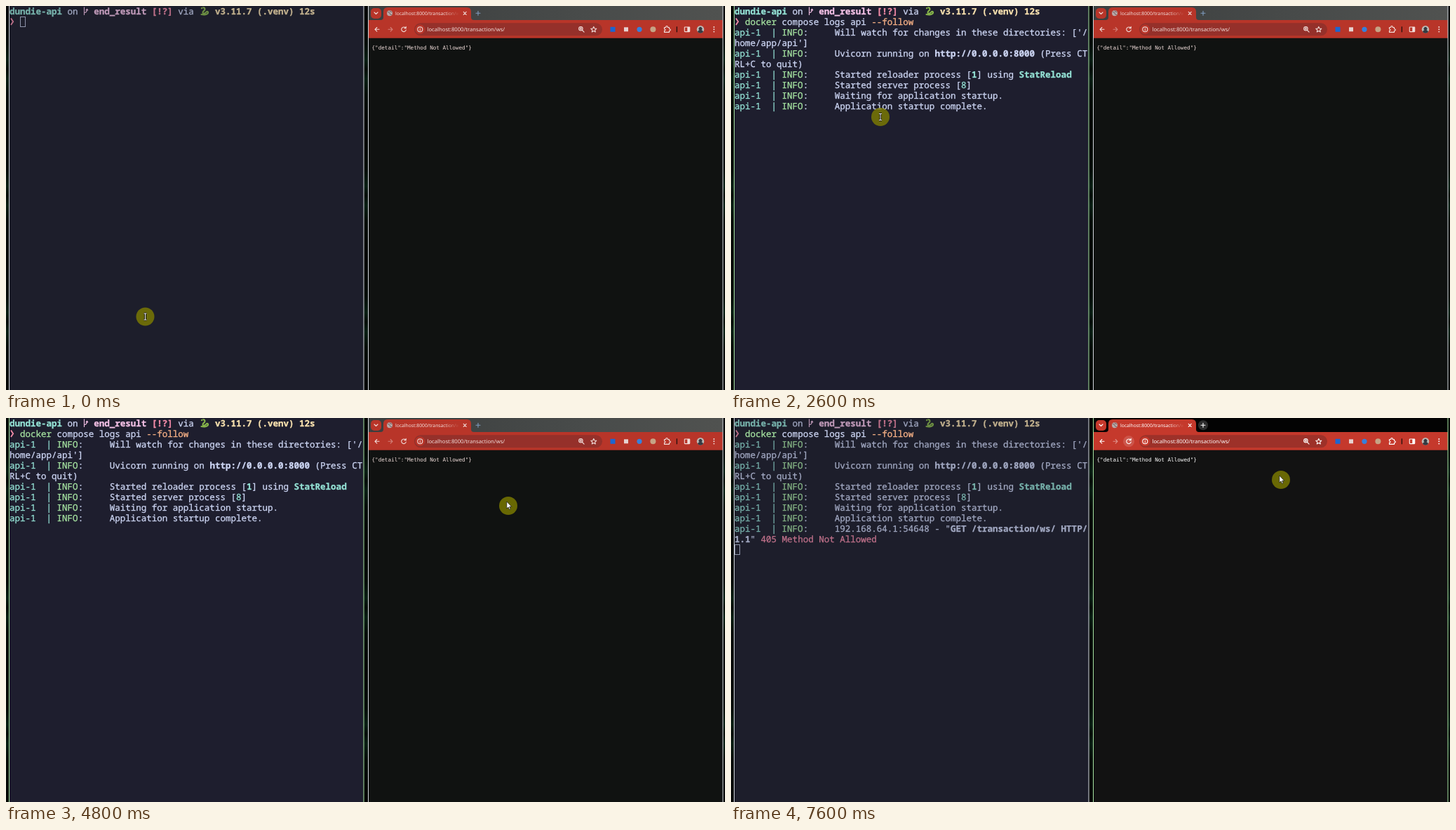
An HTML page for the animation above (8000 ms loop, 1025x547 px).

```html
<!DOCTYPE html>
<html lang="en">
<head>
<meta charset="utf-8">
<title>Terminal and browser</title>
<style>
html, body { margin: 0; width: 100%; height: 100%; overflow: hidden; background: #050807; }
svg { position: absolute; left: 0; top: 0; width: 1025px; height: 547px; }
[hidden] { display: none !important; }

#term {
  --edge: #d3d7dd; position: absolute; left: 5px; top: 0; width: 505px; height: 547px;
  background: #1d1e2b; overflow: hidden;
}
#term.focus { background: #1e1e2e; }
#prompt, #log, #request, #glyphs { opacity: .75; }
.focus :is(#prompt, #log, #request, #glyphs) { opacity: 1; }
.row {
  --c: #cdd6f4; height: 15px; width: 504px; color: var(--c); white-space: pre;
  font: 500 12.53px/15px "Noto Sans Mono", monospace; -webkit-text-stroke: .3px;
  text-rendering: geometricPrecision; font-variant-ligatures: none;
}
.row i { display: inline-block; height: 15px; vertical-align: top; font-style: normal; color: var(--c); }
.teal { --c: #94e2d5; }
.green { --c: #a6e3a1; }
.pink { --c: #f5c2e7; }
.red { --c: #f38ba8; }
.yellow { --c: #f9e2af; }
.peach { --c: #fab387; }
.bold { font-weight: 700; }
.selected .row { background: #cdd6f4; color: #1e1e2e; }
.selected .row i { background: var(--c); color: #1e1e2e; }
#cursor {
  position: absolute; left: 0; top: 0; width: 8px; height: 15px; box-sizing: border-box;
  border: 1px solid #9096ad;
}
.focus #cursor { background: #cdd6f4; border-color: #cdd6f4; }

#web { --bar: #b83529; --page: #101211; --pill: #95302a; --ink: #f1dedb; --plus: #7f9dc0; }
#web.focus { --bar: #c5392c; --page: #121212; --pill: #9d3129; --ink: #fff; --plus: #fff; }
#web.typing { --pill: #2b2322; }
#web text { fill: var(--ink); text-rendering: geometricPrecision; }
.bar { fill: var(--bar); }
.line { fill: none; stroke: var(--ink); stroke-width: 1.1; stroke-linecap: round; stroke-linejoin: round; }
#plus { stroke: var(--plus); }
#ring { opacity: 0; }
.focus #ring { opacity: .17; }
.focus #haze { display: none; }
.ui { font-family: "Noto Sans", sans-serif; }
#json { font: 7.63px "DejaVu Sans Mono", monospace; }
.edge { fill: none; stroke: #d3d7dd; }
.edge.focus { stroke: #a6e3a1; }
</style>
</head>
<body>
<svg viewBox="0 0 1025 547">
  <defs>
    <linearGradient id="leaf" x2="0" y2="90" gradientUnits="userSpaceOnUse" spreadMethod="reflect">
      <stop offset="0" stop-color="#040605"/><stop offset=".6" stop-color="#060d09"/>
      <stop offset=".85" stop-color="#0a1f14"/><stop offset="1" stop-color="#060d09"/>
    </linearGradient>
    <linearGradient id="strip">
      <stop offset="0" stop-color="#3b3e3e"/><stop offset=".6" stop-color="#484b4a"/>
      <stop offset="1" stop-color="#505250"/>
    </linearGradient>
    <linearGradient id="fade" x1="625" x2="646" y1="0" y2="0" gradientUnits="userSpaceOnUse">
      <stop offset="0" stop-color="#fff"/><stop offset="1" stop-color="#000"/>
    </linearGradient>
    <mask id="cut"><rect x="540" width="110" height="20" fill="url(#fade)"/></mask>
  </defs>
  <rect width="1025" height="547" fill="url(#leaf)"/>
</svg>

<div id="term">
  <div class="row" id="prompt"></div>
  <div class="row"><span id="command" data-show="1000-8000"></span></div>
  <div id="log" data-show="1800-8000"></div>
  <div id="request" data-show="7300-8000"></div>
  <svg viewBox="5 0 1025 547" id="glyphs">
    <path d="M7 17.6l3.2 4.7L7 27" fill="none" stroke="#f38ba8" stroke-width="1.8"/>
    <path d="M111.5 1.5v11.5M111.5 9.5q4-.2 4-4.5M113.8 6.3l1.7-2 1.5 2" fill="none" stroke="#f5c2e7" stroke-width="1.1"/>
    <path d="M279 3.2q3.6-2.2 4.5.8c.6 2.8-4 3.6-3 5.8 1 2 4 .2 5-1.2 1.2-1.4 3-.6 2.5 1.2-.8 2.8-6 3-9.5 2.2" fill="none" stroke="#86b34a" stroke-width="2.2" stroke-linecap="round"/>
    <circle cx="280.4" cy="2.8" r=".6" fill="#1e1e2e"/>
  </svg>
  <div id="cursor"></div>
</div>

<svg id="web" viewBox="0 0 1025 547">
  <rect x="516" width="506" height="547" fill="var(--page)"/>
  <rect x="516" width="506" height="21" fill="#030303"/>
  <rect id="haze" x="516" width="506" height="21" fill="url(#strip)"/>
  <path class="bar" d="M516 20h18q4 0 4-4V8q0-6 6-6h113q6 0 6 6v8q0 4 4 4h355v25.7H516z"/>
  <rect class="bar" x="520" y="3" width="15" height="15" rx="5"/>
  <path class="line" d="M525 9l2.5 2.5L530 9"/>
  <circle cx="547" cy="10.3" r="4" fill="#b9a8a8"/>
  <path d="M544 8.5q3 0 3 2t3 2M547 6.5q0 2 3 2" fill="none" stroke="#73615f"/>
  <g mask="url(#cut)"><text class="ui" x="555" y="12.8" font-size="6.75">localhost:8000/transaction/ws/</text></g>
  <path class="line" d="M652.2 8.3l4 4m0-4l-4 4"/>
  <circle id="ring" cx="673" cy="10.3" r="7" fill="#fff"/>
  <path id="plus" class="line" d="M670 10.3h6m-3-3v6"/>

  <path class="line" d="M532 33.3h-6m2.8-2.8l-2.8 2.8 2.8 2.8"/>
  <path class="line" opacity=".45" d="M545 33.3h6m-2.8-2.8l2.8 2.8-2.8 2.8"/>
  <circle cx="567" cy="33.3" r="8" fill="#fff" opacity=".15" data-show="6500-8000"/>
  <path class="line" data-show="0-6800 7500-8000" d="M569.6 31.2a3.3 3.3 0 1 0 .7 2.8M570.2 29.4v2.4h-2.4"/>
  <path class="line" data-show="6800-7500" d="M564.5 30.8l5 5m0-5l-5 5"/>

  <rect x="582" y="24.3" width="268" height="18" rx="9" fill="var(--pill)"/>
  <rect x="581.7" y="24" width="268.6" height="18.4" rx="9.2" fill="none" stroke="#a8c7fa" stroke-width="1.4" data-show="5700-7300"/>
  <circle class="bar" cx="590.3" cy="33.3" r="6.8"/>
  <circle class="line" cx="590.3" cy="33.3" r="3.5" stroke-width=".9"/>
  <path class="line" d="M590.3 33v2m0-3.7v.1"/>
  <rect x="600.5" y="27.5" width="111.5" height="11.5" fill="#0f5285" data-show="5700-5900"/>
  <text class="ui" x="600.5" y="36" font-size="7.67">localhost:8000/transaction/ws/</text>
  <path class="line" d="M821.5 34.5l2.6 2.6M818 32.3h2.8m-1.4-1.4v2.8"/>
  <circle class="line" cx="819.4" cy="32.3" r="2.7"/>
  <path class="line" d="M837.8 29.4l1.2 2.6 2.8.3-2.1 1.9.6 2.8-2.5-1.4-2.5 1.4.6-2.8-2.1-1.9 2.8-.3z"/>

  <rect x="861.5" y="29.8" width="7" height="7" fill="#1b66d1"/>
  <rect x="881" y="30.3" width="6" height="6" fill="#e6d2d0"/>
  <circle cx="903" cy="33.3" r="3.6" fill="#3680dc"/>
  <circle cx="922.4" cy="33.3" r="4" fill="#c6a385"/>
  <path class="line" d="M938.5 30.5h2.3q-.3-2 1.2-2t1.2 2h2.3v2.3q1.8-.2 1.8 1.2t-1.8 1.2v2.2h-7v-2.3q1.6 0 1.6-1.2t-1.6-1.2z"/>
  <path d="M956.4 29.3v8" stroke="#24100e" stroke-width="1.3"/>
  <rect class="line" x="967.3" y="30" width="7.4" height="6.6" rx=".6"/>
  <rect x="971.3" y="30" width="3.4" height="6.6" fill="var(--ink)"/>
  <circle cx="990" cy="33.3" r="5.2" fill="#bcb9b5"/>
  <path d="M986 36.8q.7-2.3 2.6-2.6a2.4 2.4 0 1 1 2.8 0q2 .3 2.6 2.6a5.2 5.2 0 0 1-8 0" fill="#343a42"/>
  <g fill="var(--ink)"><circle cx="1009.3" cy="30" r=".95"/><circle cx="1009.3" cy="33.3" r=".95"/><circle cx="1009.3" cy="36.6" r=".95"/></g>

  <text id="json" x="521.5" y="61.6">{"detail":"Method Not Allowed"}</text>
</svg>

<svg viewBox="0 0 1025 547">
  <path id="termEdge" class="edge" d="M4.5 0v547M510 0v547"/>
  <path id="webEdge" class="edge" d="M516.5 0v547M1022 0v547"/>
  <g id="pointer">
    <circle r="13" fill="#828000" fill-opacity=".78"/>
    <g id="beam" fill="none">
      <path d="M-2-4.5H2M0-4.5v9M-2 4.5H2" stroke="#000" stroke-width="2.6"/>
      <path d="M-2-4.5H2M0-4.5v9M-2 4.5H2" stroke="#fff"/>
    </g>
    <path id="arrow" d="M-2.2-6v10l2.3-2 1.5 3.5 1.6-.7L1.7 1.4h3.1z" fill="#fff" stroke="#111" stroke-width=".7"/>
  </g>
</svg>

<script>
const LOOP = 8000;
const $ = id => document.getElementById(id);
const ink = (style, text) => `<i class="${style}">${text}</i>`;
const info = text => ink('teal', 'api-1  | ') + ink('green', 'INFO') + ':     ' + text;
const rows = list => list.map(html => `<div class="row">${html}</div>`).join('');

$('prompt').innerHTML = ink('teal bold', 'dundie-api') + ' on   ' +
  ink('pink bold', 'end_result') + ' ' + ink('red bold', '[!?]') + ' via    ' +
  ink('yellow bold', 'v3.11.7 (.venv) 12s');
$('command').innerHTML = '  ' + ink('green', 'docker') + ' compose logs api ' + ink('peach', '--follow');
$('log').innerHTML = rows([
  info("Will watch for changes in these directories: ['/"),
  "home/app/api']",
  info('Uvicorn running on <b>http://0.0.0.0:8000</b> (Press CT'),
  'RL+C to quit)',
  info(`Started reloader process [${ink('teal bold', 1)}] using ${ink('teal bold', 'StatReload')}`),
  info(`Started server process [${ink('teal', 8)}]`),
  info('Waiting for application startup.'),
  info('Application startup complete.')
]);
$('request').innerHTML = rows([
  info('192.168.64.1:54648 - "<b>GET /transaction/ws/ HTTP/</b>'),
  '<b>1.1</b>" ' + ink('red', '405 Method Not Allowed')
]);

// time, x, y, shape
const pointerSteps = [
  [0, 198.5, 442.5, 'beam'], [200, 203, 350, 'beam'], [300, 211, 210, 'beam'],
  [400, 214, 166, 'beam'], [600, 213, 164, 'beam'], [1000, 0, 0, ''],
  [2400, 213, 164, 'beam'], [2500, 213, 161, 'beam'], [2600, 213, 158, 'beam'],
  [3700, 62, 42, 'beam'], [3900, 105, 78, 'beam'], [4000, 137, 106, 'beam'],
  [4800, 716, 125, 'arrow'], [4900, 729, 121, 'arrow'], [5000, 735, 119, 'arrow'],
  [5700, 664, 42, 'arrow'], [5900, 765, 49, 'arrow'], [6000, 818, 40, 'arrow'],
  [6500, 564.5, 34.5, 'arrow'], [7300, 784, 88, 'arrow']
];
// time, column, row (column -1: blinked off)
const cursorSteps = [
  [0, 2, 1], [1000, 34, 1], [1700, 0, 2], [1800, 0, 10], [2500, -1, 0], [5700, 0, 10], [7300, 0, 12]
];

const latest = (steps, t) => steps.findLast(step => step[0] <= t);
const within = (t, from, to) => t >= from && t < to;
const timed = [...document.querySelectorAll('[data-show]')].map(el => ({
  el, spans: el.dataset.show.split(' ').map(span => span.split('-').map(Number))
}));

function draw(t) {
  for (const { el, spans } of timed)
    el.toggleAttribute('hidden', !spans.some(([from, to]) => within(t, from, to)));

  for (const id of ['term', 'termEdge']) $(id).classList.toggle('focus', within(t, 200, 5700));
  for (const id of ['web', 'webEdge']) $(id).classList.toggle('focus', t >= 5700);
  $('web').classList.toggle('typing', within(t, 5700, 7300));
  $('log').classList.toggle('selected', within(t, 3700, 4800));

  const [, column, row] = latest(cursorSteps, t);
  $('cursor').hidden = column < 0;
  $('cursor').style.transform = `translate(${column * 7.518}px, ${row * 15}px)`;

  const [, x, y, shape] = latest(pointerSteps, t);
  $('pointer').toggleAttribute('hidden', !shape);
  $('pointer').setAttribute('transform', `translate(${x} ${y})`);
  for (const name of ['beam', 'arrow']) $(name).toggleAttribute('hidden', name !== shape);
}

function tick() {
  draw(performance.now() % LOOP);
  requestAnimationFrame(tick);
}
tick();
</script>
</body>
</html>
```
